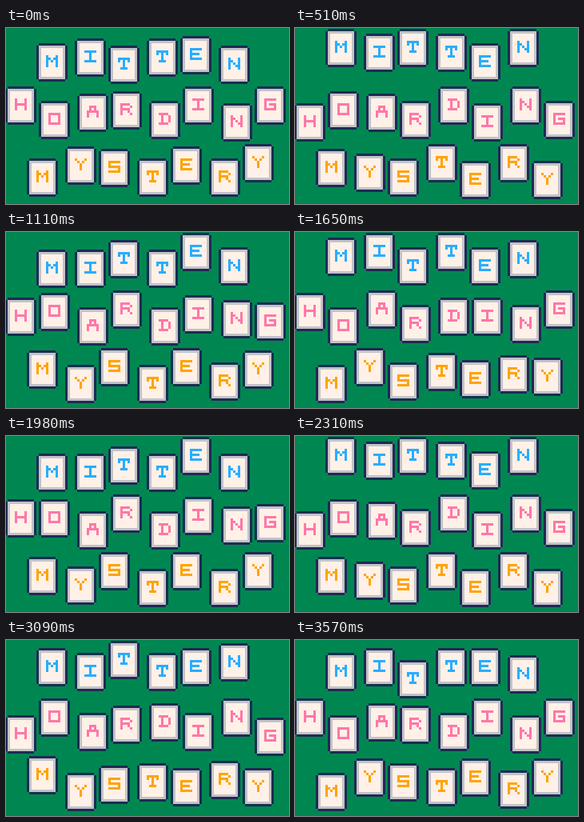
Write an HTML page with a canvas that moves like this. It is 354 px wide and 220 px high and loops after 3.6 s.

```html
<!DOCTYPE html>
<html lang="en">
<head>
<meta charset="utf-8">
<style>
  html, body { margin: 0; width: 100%; height: 100%; overflow: hidden; background: #008751; }
  canvas { display: block; width: 354px; height: 220px; }
</style>
</head>
<body>
<canvas id="stage" width="354" height="220" role="img" aria-label="Mitten Hoarding Mystery"></canvas>
<script>
const ctx = document.getElementById('stage').getContext('2d');
const CELL = 3, STEP = 30, CYCLE = 30;

// 5 x 5 letters, one string per row
const GLYPHS = {
  A: ['.###.', '.#.#.', '#####', '#...#', '#...#'],
  D: ['####.', '.#..#', '.#..#', '.#..#', '####.'],
  E: ['#####', '#....', '####.', '#....', '#####'],
  G: ['#####', '#....', '#.###', '#...#', '#####'],
  H: ['#...#', '#...#', '#####', '#...#', '#...#'],
  I: ['#####', '..#..', '..#..', '..#..', '#####'],
  M: ['#...#', '##.##', '#.#.#', '#...#', '#...#'],
  N: ['#...#', '##..#', '#.#.#', '#..##', '#...#'],
  O: ['#####', '#...#', '#...#', '#...#', '#####'],
  R: ['####.', '#...#', '####.', '#..#.', '#...#'],
  S: ['#####', '#....', '#####', '....#', '#####'],
  T: ['#####', '#.#.#', '..#..', '..#..', '.###.'],
  Y: ['#...#', '.#.#.', '..#..', '..#..', '..#..']
};

// lows: the step of the cycle at which each card hangs lowest
const ROWS = [
  { word: 'MITTEN', color: '#29adff', x: 38, y: 1, stagger: 3,
    lows: [4.3, 7.2, 29, 7.2, 21.4, 2.8] },
  { word: 'HOARDING', color: '#ff77a8', x: -1, y: 73, stagger: -3,
    lows: [14.8, 26.5, 8.4, 21, 3.6, 16.5, 29.9, 13] },
  { word: 'MYSTERY', color: '#ffa300', x: 26, y: 145, stagger: 3,
    lows: [26.5, 10.3, 20.48, 4.3, 18.8, 3.5, 18.1] }
];

function drawCard(x, y, letter, color) {
  const block = (cx, cy, w, h, fill) => {
    ctx.fillStyle = fill;
    ctx.fillRect(x + cx * CELL, y + cy * CELL, w * CELL, h * CELL);
  };
  block(1, 0, 11, 16, '#1d2b53');
  block(0, 1, 13, 14, '#1d2b53');
  block(1, 1, 11, 14, '#c2c3c7');
  block(2, 2, 9, 12, '#fff1e8');
  GLYPHS[letter].forEach((line, r) => {
    [...line].forEach((dot, c) => {
      if (dot === '#') block(4 + c, 5 + r, 1, 1, color);
    });
  });
}

function draw(step) {
  ctx.fillStyle = '#008751';
  ctx.fillRect(0, 0, 354, 220);
  for (const row of ROWS) {
    [...row.word].forEach((letter, i) => {
      const angle = (step - row.lows[i]) / CYCLE * 2 * Math.PI;
      const drop = Math.floor(4 + 4 * Math.cos(angle));
      const x = row.x + 45 * i + (i % 2) * row.stagger;
      drawCard(x, row.y + drop * CELL, letter, row.color);
    });
  }
}

const start = performance.now();
function tick() {
  const elapsed = performance.now() - start;
  draw(Math.floor(elapsed / STEP) % CYCLE);
  requestAnimationFrame(tick);
}
tick();
</script>
</body>
</html>
```
